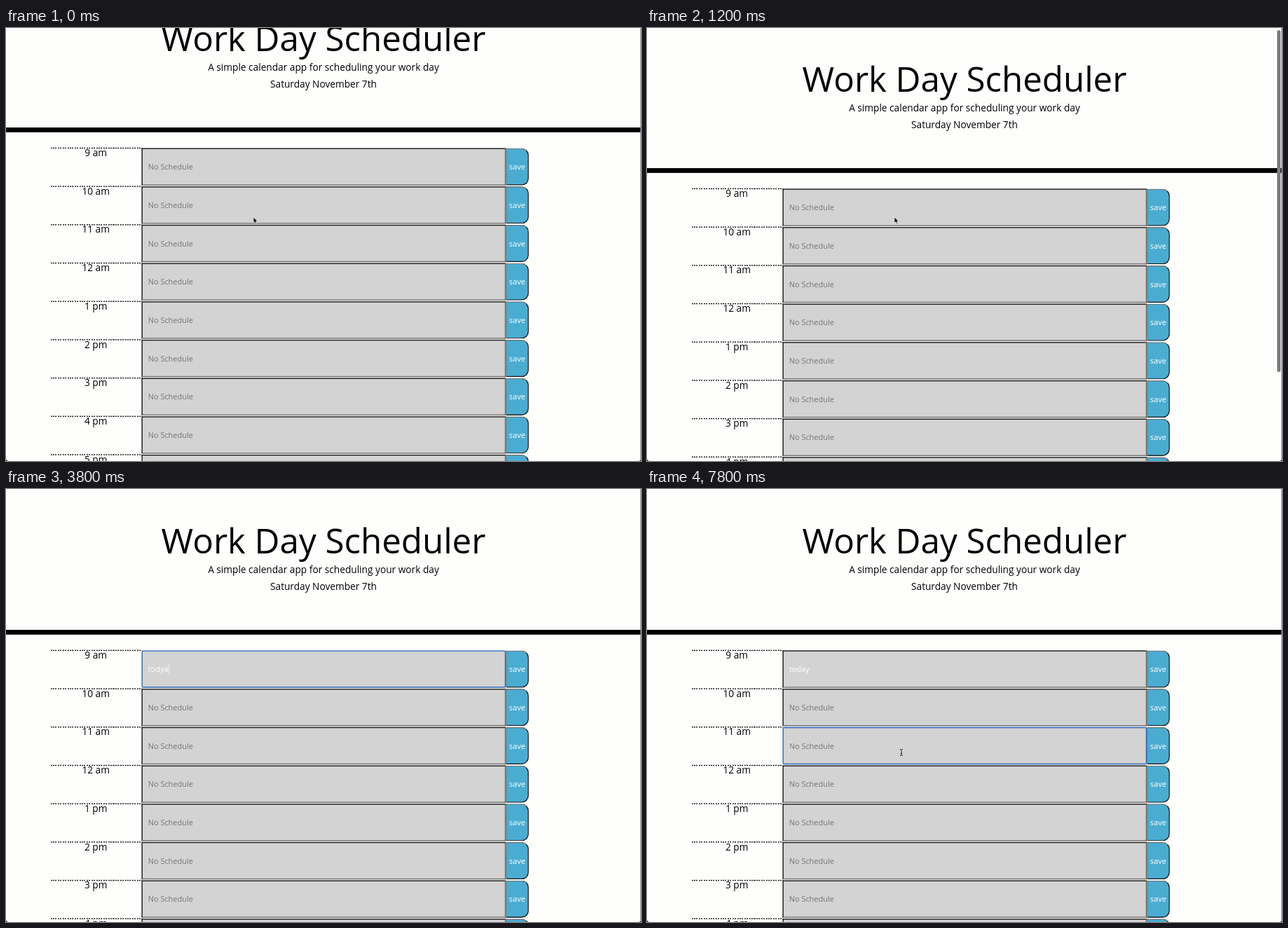
Write an HTML page that moves like this. It is 906 px wide and 618 px high and loops after 8 s.

```html
<!DOCTYPE html>
<html lang="en">
<head>
<meta charset="utf-8">
<title>Work Day Scheduler</title>
<style>
  * { box-sizing: border-box; }
  html, body { margin: 0; width: 100%; height: 100%; overflow: hidden; background: #222; }
  #stage { position: relative; width: 906px; height: 618px; overflow: hidden;
    background: #fefefd; border-radius: 0 0 4px 4px; }
  #page { position: absolute; left: 0; top: 0; width: 1325px; transform-origin: 0 0;
    font: 20px/1 "Open Sans", "Noto Sans", sans-serif; color: #000; white-space: nowrap; }
  header { height: 304.4px; padding-top: 64px; margin-bottom: 32px; text-align: center;
    border-bottom: 10px solid #000; }
  h1 { margin: 0 0 8px; font-size: 72px; font-weight: 400; line-height: 86.4px; }
  p { margin: 0 0 16px; }
  .row { position: relative; height: 80px; margin-left: 92.5px; }
  .row > * { position: absolute; top: 1px; height: 78px; }
  .row .hour { top: 0; width: 190px; padding-top: 1px; text-align: center; }
  .hour::before { content: ""; position: absolute; left: 0; top: 0; width: 100%; height: 1.3px;
    background: repeating-linear-gradient(90deg, #111 0 3px, transparent 3px 5px); }
  .field, .save { border: 2px solid; font-size: 16px; line-height: 74px; }
  .field { left: 190px; width: 760px; padding-left: 12px; background: #d3d3d3; color: #757575;
    border-color: #161616 #6e6e6e #6e6e6e #161616; }
  .field.typed { color: #fff; }
  .field.focus { border-color: #2563b8; border-radius: 3px; }
  .field i { display: inline-block; width: 1.5px; height: 20px; margin-right: -1.5px;
    vertical-align: -5px; background: #fff; }
  .save { left: 950px; width: 48.5px; background: #4bacd1; color: #fff; text-align: center;
    border-color: #6e6e6e #161616 #161616 #6e6e6e; border-radius: 0 15px 15px 0; }
  #thumb { position: absolute; left: 899px; width: 5px; height: 488px; border-radius: 3px; background: #7d7d7d; }
  #edge { position: absolute; right: 0; top: 0; width: 1px; height: 100%; background: #8a8a8a; }
  svg { position: absolute; left: 0; top: 0; }
</style>
</head>
<body>
<div id="stage">
  <div id="page">
    <header>
      <h1>Work Day Scheduler</h1>
      <p>A simple calendar app for scheduling your work day</p>
      <p>Saturday November 7th</p>
    </header>
  </div>
  <div id="edge"></div>
  <div id="thumb"></div>
  <svg width="906" height="618">
    <path id="arrow" d="M0 0V8.2L1.9 6.5L3.1 9.3L4.6 8.7L3.4 6H5.9Z" fill="#000" stroke="#fff" stroke-width=".6"/>
    <g id="beam" fill="none">
      <path d="M-2-4.5Q0-4.5 0-3.5Q0-4.5 2-4.5M0-3.5V3.5M-2 4.5Q0 4.5 0 3.5Q0 4.5 2 4.5M-1 1.5H1" stroke="#fff" stroke-width="2" opacity=".6"/>
      <path d="M-2-4.5Q0-4.5 0-3.5Q0-4.5 2-4.5M0-3.5V3.5M-2 4.5Q0 4.5 0 3.5Q0 4.5 2 4.5M-1 1.5H1" stroke="#111"/>
    </g>
  </svg>
</div>
<script>
const LOOP = 8000, STEP = 200, SCALE = 0.6837;
const $ = id => document.getElementById(id);
const page = $('page');
const hours = ['9 am', '10 am', '11 am', '12 am', '1 pm', '2 pm', '3 pm', '4 pm', '5 pm', '6 pm'];

const fields = hours.map(hour => {
  const row = document.createElement('div');
  row.className = 'row';
  row.innerHTML = `<div class="hour">${hour}</div><div class="field"></div><div class="save">save</div>`;
  page.append(row);
  return row.children[1];
});

// Scroll offset for each step, then resting at the top
const scroll = [59, 130, 161, 153, 122, 45, 1];

// [start time, text]
const typing = [[0, ''], [3000, 't'], [3200, 'to'], [3400, 'tod'], [3600, 'tody'], [3800, 'todya'],
  [4000, 'tody'], [4200, 'tod'], [4400, 'toda'], [4600, 'today']];

// [start time, shape, x, y]
const pointer = [
  [0, 'arrow', 353, 270], [1400, 'arrow', 347, 272], [1600, 'arrow', 340, 273.5],
  [2000, 'beam', 334, 268], [2200, 'beam', 330, 263], [2800, ''],
  [5400, 'beam', 378, 287], [5600, 'beam', 386, 286], [5800, 'beam', 520, 281],
  [6000, 'beam', 660, 270], [6200, 'arrow', 735, 260], [6800, 'arrow', 722, 272],
  [7000, 'beam', 600, 318], [7200, 'beam', 450, 362], [7400, 'beam', 369, 376], [7600, 'beam', 363, 376]
];

// [start time, focused row, caret shown]
const focus = [[0, -1], [2400, 0, true], [4800, 0, false], [5000, 0, false], [5200, 0, true],
  [5400, 0, false], [6000, 0, true], [6400, -1], [7600, 2, true]];

const latest = (list, t) => list.findLast(item => item[0] <= t);

function setField(field, text, focused, caret) {
  const bar = caret ? '<i></i>' : '';
  field.className = 'field' + (text ? ' typed' : '') + (focused ? ' focus' : '');
  field.innerHTML = text ? text + bar : bar + 'No Schedule';
}

function draw(t) {
  const y = scroll[t / STEP] || 0;
  page.style.transform = `translateY(${-y}px) scale(${SCALE})`;
  $('thumb').style.top = 2 + y * 0.785 + 'px';
  $('thumb').style.opacity = t < STEP || t >= 2200 ? 0 : t >= 2000 ? 0.5 : 1;

  const text = latest(typing, t)[1];
  const [, active, caret] = latest(focus, t);
  fields.forEach((field, i) => setField(field, i ? '' : text, i === active, i === active && caret));

  const [, shape, px, py] = latest(pointer, t);
  for (const id of ['arrow', 'beam']) {
    $(id).style.display = id === shape ? '' : 'none';
    if (id === shape) $(id).setAttribute('transform', `translate(${px} ${py})`);
  }
}

let shown = -1;
function tick() {
  const t = Math.floor(performance.now() % LOOP / STEP) * STEP;
  if (t !== shown) draw(shown = t);
  requestAnimationFrame(tick);
}
tick();
</script>
</body>
</html>
```
